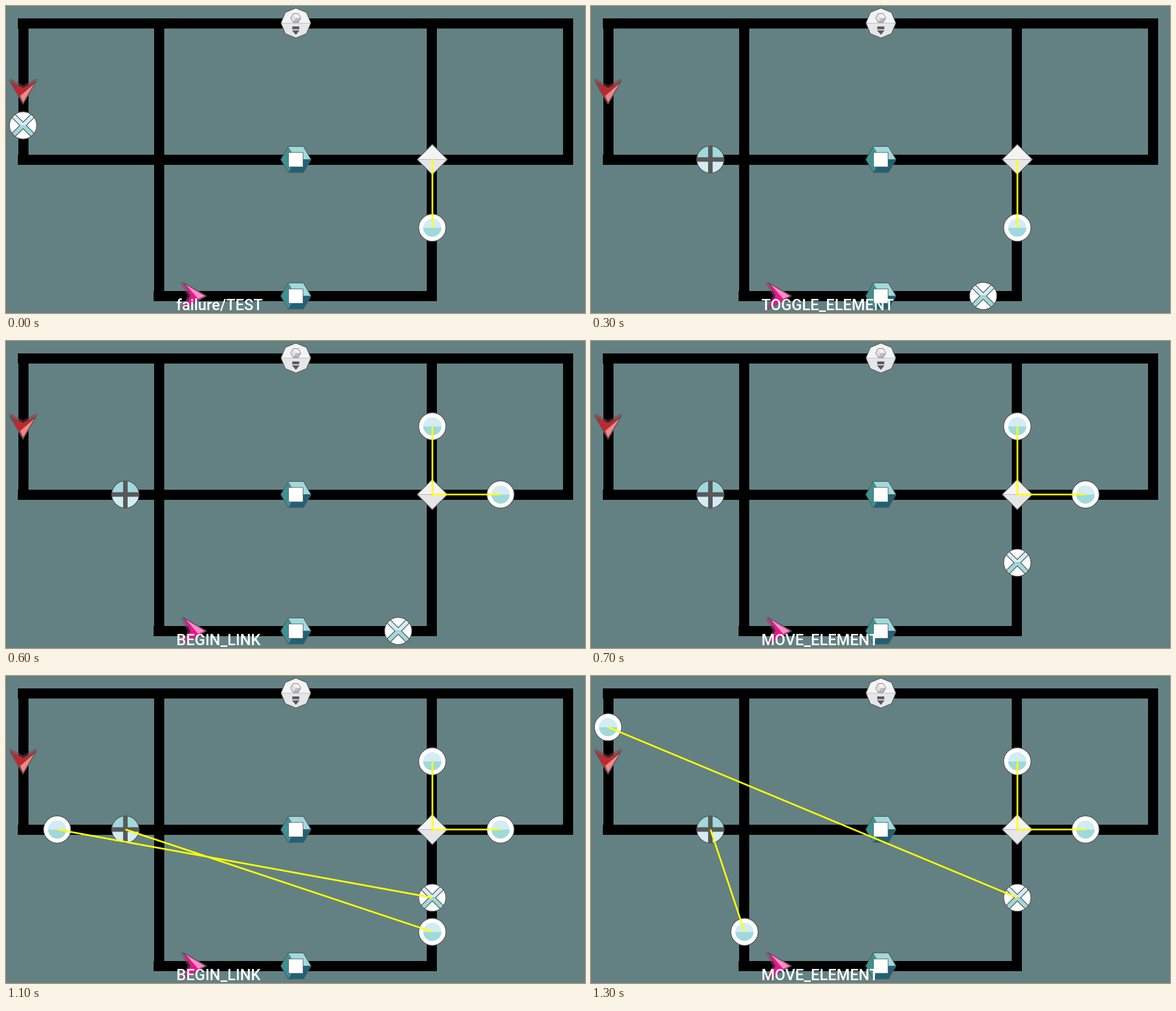
Recreate the animation shown at these times as an HTML page with a canvas. Size 1028 by 545 pixels, loop 1400 ms.

```html
<!DOCTYPE html>
<html lang="en">
<head>
<meta charset="utf-8">
<title>Track editor steps</title>
<style>
html, body { margin: 0; width: 100%; height: 100%; overflow: hidden; background: #638183; }
canvas { display: block; }
</style>
</head>
<body>
<canvas id="stage" width="1028" height="545"></canvas>
<script>
const ctx = document.getElementById('stage').getContext('2d');
const STEP = 100, CELL = 60.55, ORIGIN = 30.3;
const OUTLINE = '#58595b', PALE = '#d3ecf4', AQUA = '#a0d9db';
const at = n => ORIGIN + n * CELL;

// Each step: caption, parts placed or changed as [kind, column, row], links added.
const script = [
  ['failure/TEST', { a: ['cross', 0, 3], b: ['ring', 12, 6], d: ['diamond', 12, 4] }, ['db']],
  ['MOVE_ELEMENT', { a: ['cross', 3, 4] }],
  ['ADD_ELEMENT', { c: ['cross', 11, 8] }],
  ['TOGGLE_ELEMENT', { a: ['plus', 3, 4] }],
  ['MOVE_ELEMENT', { b: ['ring', 12, 2] }],
  ['ADD_ELEMENT', { e: ['ring', 14, 4] }],
  ['BEGIN_LINK', {}, ['de']],
  ['MOVE_ELEMENT', { c: ['cross', 12, 6] }],
  ['ADD_ELEMENT', { f: ['ring', 1, 4] }],
  ['ADD_ELEMENT', { g: ['ring', 12, 7] }],
  ['BEGIN_LINK', {}, ['fc']],
  ['BEGIN_LINK', {}, ['ag']],
  ['MOVE_ELEMENT', { f: ['ring', 0, 1] }],
  ['MOVE_ELEMENT', { g: ['ring', 4, 7] }]
];

let scene = { parts: {}, links: [] };
const scenes = script.map(([caption, parts, links = []]) => scene = {
  caption,
  parts: { ...scene.parts, ...parts },
  links: [...scene.links, ...links]
});

function poly(points, fill, stroke, width = 1.3) {
  ctx.beginPath();
  for (let i = 0; i < points.length; i += 2) ctx.lineTo(points[i], points[i + 1]);
  ctx.closePath();
  paint(fill, stroke, width);
}

function disc(r, fill, stroke, from = 0, to = 2 * Math.PI) {
  ctx.beginPath();
  ctx.arc(0, 0, r, from, to);
  paint(fill, stroke, 1.4);
}

function paint(fill, stroke, width) {
  if (fill) { ctx.fillStyle = fill; ctx.fill(); }
  if (stroke) { ctx.strokeStyle = stroke; ctx.lineWidth = width; ctx.stroke(); }
}

function halves(r, top, bottom) {
  disc(r, top, null, Math.PI, 2 * Math.PI);
  disc(r, bottom, null, 0, Math.PI);
}

// Hexagon made of three rhombic facets.
function hexagon(r, left, top, bottom) {
  const h = r / 2, v = r * 0.866;
  poly([-r, 0, -h, -v, 0, 0, -h, v], left);
  poly([-h, -v, h, -v, r, 0, 0, 0], top);
  poly([-h, v, h, v, r, 0, 0, 0], bottom);
  poly([-r, 0, -h, -v, h, -v, r, 0, h, v, -h, v], null, OUTLINE, r > 12 ? 1.3 : 0.8);
}

const shapes = {
  ring() {
    disc(24.2, '#fff', OUTLINE);
    halves(16.2, PALE, AQUA);
  },
  cross() {
    halves(24.2, PALE, AQUA);
    ctx.save();
    ctx.beginPath();
    ctx.arc(0, 0, 24.2, 0, 2 * Math.PI);
    ctx.clip();
    for (let i = 0; i < 4; i++) {
      poly([0, -5.7, 30, -35.7, -30, -35.7], '#fff', OUTLINE, 1.4);
      ctx.rotate(Math.PI / 2);
    }
    ctx.restore();
    disc(24.2, null, OUTLINE);
  },
  plus() {
    halves(24.2, AQUA, PALE);
    ctx.fillStyle = OUTLINE;
    ctx.fillRect(-4, -24, 8, 48);
    ctx.fillRect(-24, -4, 48, 8);
    disc(24.2, null, OUTLINE);
  },
  diamond() {
    poly([-27, 0, 0, -27, 27, 0], '#f4f3f3');
    poly([-27, 0, 0, 27, 27, 0], '#e6e6e8');
    poly([-27, 0, 0, -27, 27, 0, 0, 27], null, OUTLINE);
  },
  block() {
    hexagon(26.8, '#3d9191', AQUA, '#1f6277');
    poly([-13, -12.5, 12.7, -12.5, 12.7, 13.2, -13, 13.2], '#fff', OUTLINE, 1);
  },
  source() {
    const k = 18.8, r = 26.6;
    poly([-r, 0, -k, -k, 0, -r, k, -k, r, 0], '#f4f3f3');
    poly([-r, 0, -k, k, 0, r, k, k, r, 0], '#e6e6e8');
    poly([-r, 0, -k, -k, 0, -r, k, -k, r, 0, k, k, 0, r, -k, k], null, OUTLINE);
    poly([-6.5, 6, 6, 6, 6, 11, -6.5, 11], OUTLINE);
    poly([-7, 13, 6.5, 13, 0, 21], OUTLINE);
    ctx.translate(-0.3, -9);
    hexagon(9, '#e2e2e4', '#f4f3f3', '#bdbdc0');
  }
};

// Arrowhead pointing down, with a faint echo behind it.
function arrow(dark, light) {
  const head = [-23.5, -18, 0, -5, 23.5, -18, 0, 22.5];
  ctx.globalAlpha = 0.5;
  ctx.translate(0, -4.5);
  poly(head, dark, OUTLINE);
  ctx.translate(0, 4.5);
  ctx.globalAlpha = 1;
  poly(head, dark, OUTLINE, 1.6);
  poly([20, -13.5, -5, 8, 0, 19.5], light);
}

function place(col, row, draw, turn = 0) {
  ctx.save();
  ctx.translate(at(col), at(row));
  ctx.rotate(turn);
  draw();
  ctx.restore();
}

function line(x1, y1, x2, y2) {
  ctx.beginPath();
  ctx.moveTo(x1, y1);
  ctx.lineTo(x2, y2);
  ctx.stroke();
}

function drawTracks() {
  ctx.fillStyle = '#000';
  for (const [x, y, w] of [[21, 22, 986], [21, 264, 986], [262, 506, 503]]) ctx.fillRect(x, y, w, 18);
  for (const [x, h] of [[22, 260], [263, 502], [747, 502], [989, 260]]) ctx.fillRect(x, 22, 18, h);
}

function draw({ caption, parts, links }) {
  ctx.fillStyle = '#638183';
  ctx.fillRect(0, 0, 1028, 545);
  drawTracks();
  place(8, 0, shapes.source);
  place(8, 4, shapes.block);
  place(8, 8, shapes.block);
  place(0, 2, () => arrow('#c1272d', '#ea8a8d'));
  place(5, 8, () => arrow('#ec148c', '#f78fc6'), -Math.PI / 2);
  for (const [kind, col, row] of Object.values(parts)) place(col, row, shapes[kind]);

  ctx.strokeStyle = '#ff0';
  ctx.lineWidth = 3;
  for (const [from, to] of links) {
    const [, c1, r1] = parts[from], [, c2, r2] = parts[to];
    line(at(c1) + 0.2, at(r1), at(c2) + 0.2, at(r2));
  }

  ctx.fillStyle = '#fff';
  ctx.font = '500 27.25px Roboto, sans-serif';
  ctx.fillText(caption, 302.5, 540);
}

function tick() {
  draw(scenes[Math.floor(performance.now() / STEP) % scenes.length]);
  requestAnimationFrame(tick);
}
tick();
</script>
</body>
</html>
```
